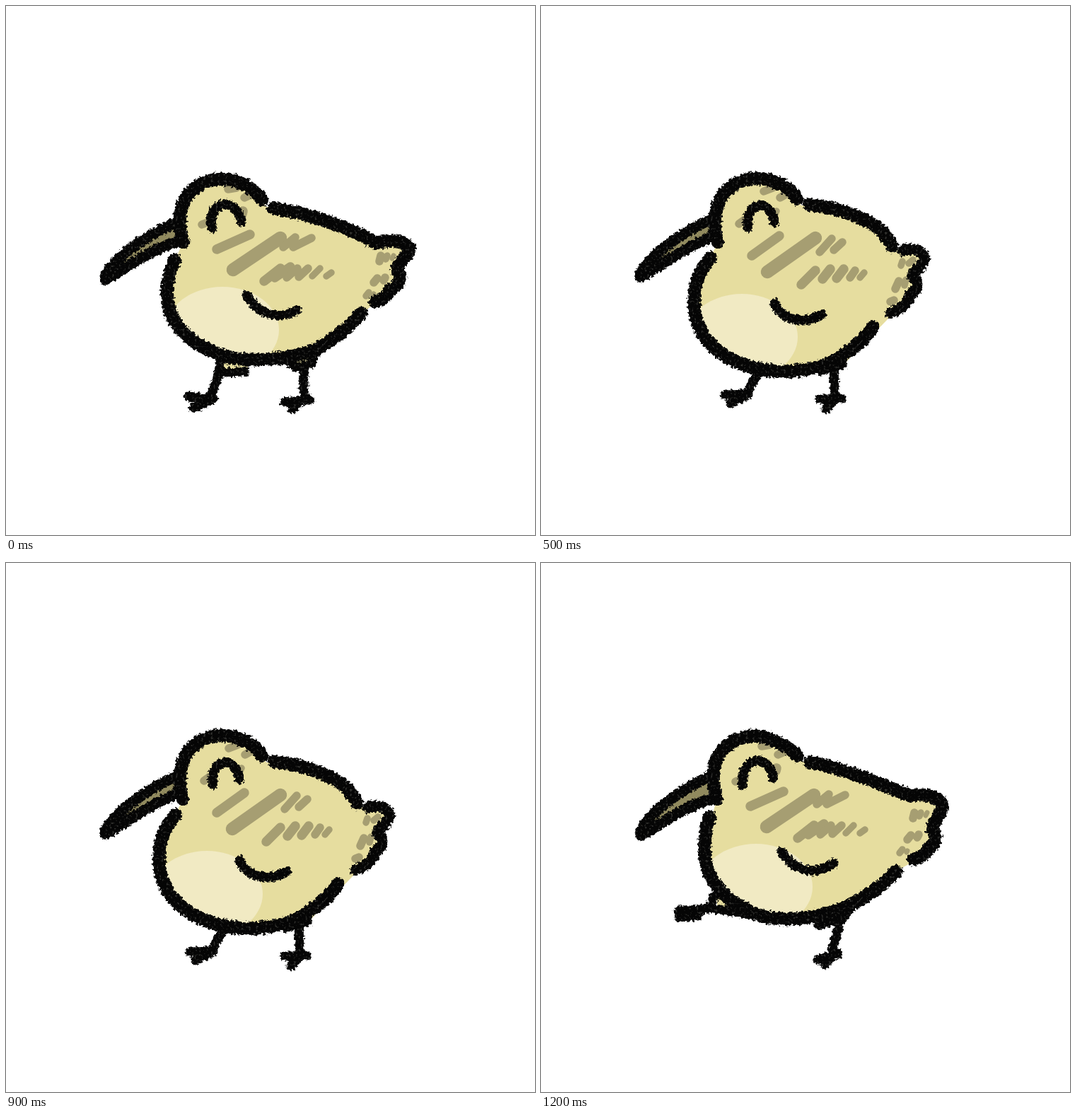
Animation, 748 px wide and 748 px high, one loop 1.3 s. Source, as an HTML page:

```html
<!DOCTYPE html>
<html lang="en">
<head>
<meta charset="utf-8">
<title>Bobbing bird</title>
<style>
html, body { margin: 0; width: 100%; height: 100%; overflow: hidden; background: #fff; }
svg { display: block; width: 100%; height: 100%; fill: none; stroke-linecap: round; stroke-linejoin: round; }
.body, .patch { fill: #e6dd9f; }
.belly { fill: #f1eac3; }
.beak { fill: #918a5e; }
.marks { stroke: #a69e72; }
.ink { stroke: #050505; stroke-width: 18.5; filter: url(#crayon); }
.bill { stroke-width: 15.5; }
.face { stroke-width: 13.5; }
.legs { stroke-width: 13; }
.w6 { stroke-width: 7; } .w8 { stroke-width: 9.5; } .w10 { stroke-width: 11.5; }
.w12 { stroke-width: 13.5; } .w14 { stroke-width: 15; } .w17 { stroke-width: 18.5; }

/* 13 beats of 100 ms: stand mid squat mid kick mid squat mid stand mid squat mid kick */
.pose { visibility: hidden; animation: 1300ms step-end infinite; }
#stand { animation-name: stand; }
#mid { animation-name: mid; }
#squat { animation-name: squat; }
#kick { animation-name: kick; }
@keyframes stand {
  0%, 61.538% { visibility: visible; }
  7.692%, 69.230%, 100% { visibility: hidden; }
}
@keyframes mid {
  0%, 15.384%, 30.769%, 46.153%, 61.538%, 76.923%, 92.307%, 100% { visibility: hidden; }
  7.692%, 23.076%, 38.461%, 53.846%, 69.230%, 84.615% { visibility: visible; }
}
@keyframes squat {
  0%, 23.076%, 53.846%, 84.615%, 100% { visibility: hidden; }
  15.384%, 46.153%, 76.923% { visibility: visible; }
}
@keyframes kick {
  0%, 38.461% { visibility: hidden; }
  30.769%, 92.307%, 100% { visibility: visible; }
}
</style>
</head>
<body>
<svg viewBox="0 0 748 748">
<defs>
  <!-- ragged edge plus faint grey grain -->
  <filter id="crayon" filterUnits="userSpaceOnUse" x="110" y="215" width="490" height="380" color-interpolation-filters="sRGB">
    <feTurbulence type="fractalNoise" baseFrequency=".28" numOctaves="2" seed="4" result="noise"/>
    <feDisplacementMap in="SourceGraphic" in2="noise" scale="8" xChannelSelector="R" yChannelSelector="G" result="rough"/>
    <feTurbulence type="fractalNoise" baseFrequency=".3" numOctaves="2" seed="9"/>
    <feColorMatrix values="0 0 0 0 .2  0 0 0 0 .2  0 0 0 0 .19  0 0 0 5 -2.9"/>
    <feComposite in2="rough" operator="atop"/>
  </filter>

  <path id="standBody" d="M249 337C243 300 250 247 304 245C335 245 355 260 368 284C420 289 480 312 522 336C550 328 574 334 572 343C568 356 554 364 554 374C562 386 553 400 540 402L522 420L503 435C490 452 465 473 435 487C400 500 350 503 315 497C280 487 250 468 235 440C224 415 228 385 240 357Z"/>
  <path id="midBody" d="M249 337C243 310 245 285 258 266C275 245 300 240 325 247C345 253 357 263 368 282C410 283 450 297 475 314C485 322 492 332 498 346C515 340 538 342 542 358C540 368 528 374 526 383C536 392 530 400 522 408C520 420 510 430 492 441L432 503L400 508C360 520 320 520 280 505C245 490 222 465 217 430C214 400 222 375 240 354Z"/>
  <path id="squatBody" d="M252 336C245 310 247 282 265 262C285 244 310 241 330 249C343 255 351 265 358 279L380 284C410 292 440 315 455 340C467 360 470 385 478 405L510 407C525 410 528 425 520 432C512 442 508 448 512 455C508 464 498 468 468 478C450 500 425 525 390 540C350 552 310 552 270 537C235 520 215 485 213 445C211 415 222 380 240 354Z"/>
  <path id="kickBody" d="M248 336C242 310 240 285 256 265C275 244 305 240 325 250C342 256 355 264 368 280C420 288 470 308 520 329C540 325 565 330 568 344C568 355 555 368 553 378C565 390 555 402 548 404C543 414 535 418 503 435C490 450 465 470 435 485C400 500 355 508 315 500C280 490 252 468 238 440C228 415 230 380 242 357Z"/>
  <clipPath id="standClip"><use href="#standBody"/></clipPath>
  <clipPath id="midClip"><use href="#midBody"/></clipPath>
  <clipPath id="squatClip"><use href="#squatBody"/></clipPath>
  <clipPath id="kickClip"><use href="#kickBody"/></clipPath>

  <g id="uprightMarks" class="marks">
    <path class="w17" d="M321 373L388 328"/>
    <path class="w12" d="M298 344L345 323M365 389L388 371M380 384L402 369M334 294L335 290"/>
    <path class="w10" d="M392 341L409 327M406 341L432 328M397 384L412 371M414 383L427 371M314 259L326 257M337 271L346 267M277 309L290 304M528 361L530 353M520 391L525 385M534 388L536 384"/>
    <path class="w8" d="M433 382L444 371M453 382L460 377M537 358L539 353M509 410L513 405"/>
    <path class="w6" d="M546 357L548 353M519 409L520 407"/>
  </g>
</defs>

<g id="stand" class="pose">
  <use href="#standBody" class="body"/>
  <ellipse class="belly" cx="306" cy="458" rx="80" ry="61" clip-path="url(#standClip)"/>
  <use href="#uprightMarks"/>
  <path class="beak" d="M238 306L248 332L145 386L165 354Z"/>
  <path class="patch" d="M305 500L345 500L340 516L305 518ZM398 498L438 492L430 508L408 512Z"/>
  <g class="ink">
    <path d="M251 334C247 320 243 300 249 284C257 258 280 245 304 245C330 245 350 258 362 274"/>
    <path d="M378 286C420 291 475 309 524 335C544 330 560 331 571 342C570 354 554 361 553 374C562 384 555 397 543 401C538 412 530 416 522 418"/>
    <path d="M239 359C226 385 224 415 235 440C250 468 280 487 315 497C350 503 400 500 435 487C465 472 490 450 502 434"/>
    <path class="bill" d="M236 308C200 325 160 350 141 380M141 387C170 370 210 340 249 332"/>
    <path class="face" d="M291 314C287 290 300 280 310 280C322 281 331 292 333 305M340 409C350 425 365 437 385 437C395 437 405 434 411 430"/>
    <path class="legs" d="M304 500L299 526L290 550M303 518L338 517M258 552L293 556M265 568L289 558M399 503L410 511L430 507L436 494M421 508L421 546M394 560L430 557M404 570L424 553"/>
  </g>
</g>

<g id="mid" class="pose">
  <use href="#midBody" class="body"/>
  <ellipse class="belly" cx="284" cy="468" rx="79" ry="61" clip-path="url(#midClip)"/>
  <g class="marks">
    <path class="w17" d="M320 376L388 328"/>
    <path class="w12" d="M298 353L337 325M368 394L388 374M398 386L409 372M418 385L428 372"/>
    <path class="w10" d="M394 348L411 329M414 345L426 334M437 384L444 374M315 262L328 257M338 271L345 267M280 308L287 303M501 400L506 389M494 418L499 416"/>
    <path class="w8" d="M451 384L457 377M331 294L333 290M509 367L511 361M520 364L526 359M514 395L516 387"/>
  </g>
  <path class="beak" d="M238 302L240 328L143 384L160 350Z"/>
  <g class="ink">
    <path d="M250 334C243 310 245 285 258 266C275 245 300 240 325 247C345 253 357 263 362 273"/>
    <path d="M379 281C410 283 450 295 475 313C485 321 492 330 496 340"/>
    <path d="M512 346C525 340 543 347 542 359C540 368 526 374 525 383C535 390 533 402 522 408C521 420 507 429 494 434" stroke-width="16"/>
    <path d="M240 356C222 375 214 400 217 430C222 465 245 490 280 505C320 520 360 520 400 508C430 495 455 475 469 454"/>
    <path class="bill" d="M236 304C200 320 160 348 140 378M141 383C168 368 208 338 239 328"/>
    <path class="face" d="M292 313C290 292 300 281 311 282C322 283 329 295 330 306M330 420C336 435 350 443 366 444C380 444 390 441 397 436"/>
    <path d="M397 513L424 506"/>
    <path class="legs" d="M307 520L294 542M260 550L293 549M268 562L290 551M414 510L415 546M394 556L425 555M403 570L417 553"/>
  </g>
</g>

<g id="squat" class="pose">
  <use href="#squatBody" class="body"/>
  <ellipse class="belly" cx="290" cy="484" rx="79" ry="63" clip-path="url(#squatClip)"/>
  <g class="marks">
    <path class="w17" d="M308 378L380 341M359 400L375 385"/>
    <path class="w14" d="M293 351L333 331M389 360L405 349M379 400L389 389M316 266L326 261M342 277L349 271"/>
    <path class="w12" d="M402 401L412 392M274 308L284 303M473 453L477 447"/>
    <path class="w10" d="M402 363L415 358M418 405L427 398M435 409L440 405M328 296L332 290M483 432L485 430M495 436L496 434M487 457L489 452"/>
    <path class="w8" d="M489 416L493 414M503 421L505 419"/>
  </g>
  <path class="beak" d="M240 302L244 327L180 360L190 335Z"/>
  <g class="ink">
    <path d="M250 331C245 310 247 282 265 262C285 244 310 241 330 249C343 255 349 262 352 270"/>
    <path d="M380 285C410 292 440 315 455 340C467 360 470 385 478 405L509 408C524 410 526 424 518 432C509 440 505 447 509 455C506 464 497 467 490 473C480 477 472 475 466 474"/>
    <path d="M239 356C222 380 211 415 213 445C215 485 235 520 270 537C310 552 350 552 390 540C425 525 450 500 468 478"/>
    <path class="bill" d="M239 303C208 323 170 348 150 376M150 379C185 361 215 339 244 328"/>
    <path class="face" d="M291 314C284 300 295 284 308 284C318 284 325 294 326 303M325 420C330 440 342 452 360 458C368 460 375 459 381 456"/>
    <path class="legs" d="M258 554L286 553M265 565L288 558M412 530L411 548M393 556L416 553M398 563L413 552"/>
  </g>
</g>

<g id="kick" class="pose">
  <use href="#kickBody" class="body"/>
  <ellipse class="belly" cx="304" cy="458" rx="80" ry="61" clip-path="url(#kickClip)"/>
  <use href="#uprightMarks" x="-2"/>
  <path class="beak" d="M238 302L246 333L145 384L165 350Z"/>
  <path class="patch" d="M247 468L285 492L250 490ZM390 502L435 492L425 506L395 512Z"/>
  <g class="ink">
    <path d="M248 334C242 310 240 285 256 265C275 244 305 240 325 250C342 256 355 264 363 273"/>
    <path d="M380 282C420 288 470 308 520 329C540 325 566 330 567 344C567 355 554 366 553 378C563 388 555 401 547 404C543 414 535 417 527 419"/>
    <path d="M239 359C230 380 228 415 238 440C252 468 280 490 315 500C355 508 400 500 435 485C465 470 490 450 502 436"/>
    <path class="bill" d="M236 303C200 320 158 348 141 379M142 385C172 368 210 339 247 333"/>
    <path class="face" d="M285 315C283 290 297 279 307 279C320 281 327 293 328 304M340 408C350 424 365 434 382 435C395 435 405 430 413 425"/>
    <path class="legs" d="M245 470L239 489L194 492M195 501L222 499M246 489L295 497M392 512L428 502L436 490M424 502L412 546M391 561L421 552M402 568L414 553"/>
  </g>
</g>
</svg>
</body>
</html>
```
